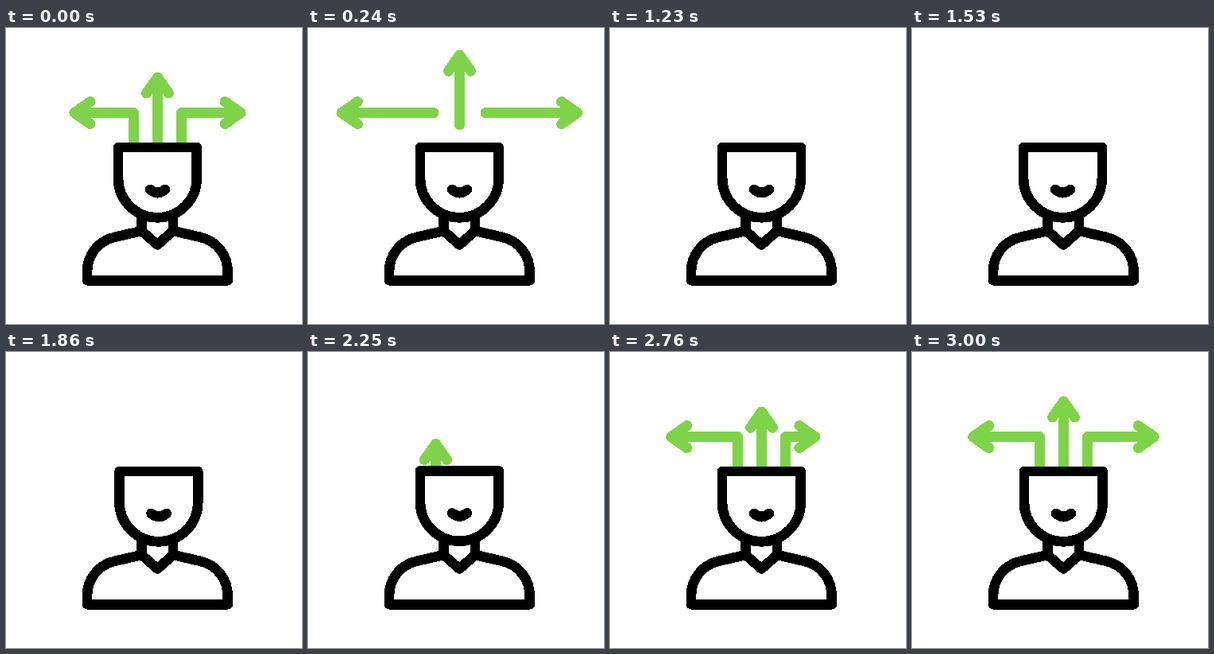
An HTML page that plays this animation: 372x372 px, repeating every 3330 ms.

```html
<!DOCTYPE html>
<html>
<head>
<meta charset="utf-8">
<style>
  html, body { margin: 0; width: 100%; height: 100%; overflow: hidden; background: #fff; }
  svg { display: block; width: 100vw; height: 100vh; }
  path {
    fill: none; stroke: #000; stroke-width: 12.6;
    stroke-linecap: round; stroke-linejoin: round; shape-rendering: crispEdges;
  }
  .arrow { stroke: #7fd348; stroke-width: 13; }
  .face { fill: #fff; }
</style>
</head>
<body>
<svg viewBox="0 0 372 372">
  <path class="arrow"/>
  <path class="arrow"/>
  <path class="arrow"/>
  <path d="M170.5 236V255L190.3 272.5 210 255V236"/>
  <path d="M170.5 255L136 263C115 268 102 286 102 307V317.3H278.7V307C278.7 286 265.7 268 244.7 263L210 255"/>
  <g id="head">
    <path class="face" d="M141 150H239.7V189a49.35 49.35 0 0 1-98.7 0Z"/>
    <path d="M181 203q9.5 8 19 0"/>
  </g>
</svg>
<script>
const LOOP = 3330, STEP = 30, BASE = 150, RISE = 43.4;
const head = document.getElementById('head');
const paths = document.querySelectorAll('.arrow');

// side: turn direction; grow: emergence start; exit: [tail, tip, travel, linear share]
const sideExit = [2.5, 118, 228, .25];
const arrows = [
  { x: 160.5, side: -1, grow: 2100, length: 127.2, power: 1.1, exit: sideExit },
  { x: 190.5, side: 0, grow: 2250, length: 88, power: 1, exit: [.5, 88, 159, .1] },
  { x: 220.5, side: 1, grow: 2400, length: 127.2, power: 1.1, exit: sideExit }
];

const clamp = v => Math.max(0, Math.min(1, v));
const sine = p => (1 - Math.cos(Math.PI * p)) / 2;

function pointAt(a, d) {
  return a.side && d > RISE
    ? [a.x + a.side * (d - RISE), BASE - RISE]
    : [a.x, BASE - d];
}

function arrowPath(a, tail, tip) {
  const turned = a.side && tip > RISE;
  const [x, y] = pointAt(a, tip);
  const corner = turned && tail < RISE ? `L${a.x} ${BASE - RISE}` : '';
  const wing = w => turned ? [x - a.side * 20, y + w] : [x + w, y + 20];
  return `M${pointAt(a, tail)}${corner}L${x} ${y}M${wing(-14)}L${x} ${y}L${wing(14)}`;
}

function arrowAt(a, t) {
  if (t < 900) {
    const [tail, tip, travel, linear] = a.exit;
    const p = t / 900;
    const shift = travel * (linear * p + (1 - linear) * sine(p));
    return arrowPath(a, tail + shift, tip + shift);
  }
  if (t <= a.grow) return '';
  const p = 1 - (1 - clamp((t - a.grow) / 600)) ** a.power;
  return arrowPath(a, 0, a.length * p);
}

function shake(t) {
  const u = t - 1200;
  const amount = clamp(u / 300) * clamp((1080 - u) / 60);
  const x = 2 * amount * Math.sin(2 * Math.PI * u / 210);
  const y = -1.5 * amount * Math.sin(2 * Math.PI * u / 330) ** 2;
  return `translate(${x} ${y})`;
}

const start = performance.now();
function draw() {
  const elapsed = (performance.now() - start) % LOOP;
  const t = Math.floor(elapsed / STEP) * STEP;
  arrows.forEach((a, i) => paths[i].setAttribute('d', arrowAt(a, t)));
  head.setAttribute('transform', shake(t));
  requestAnimationFrame(draw);
}
draw();
</script>
</body>
</html>
```
